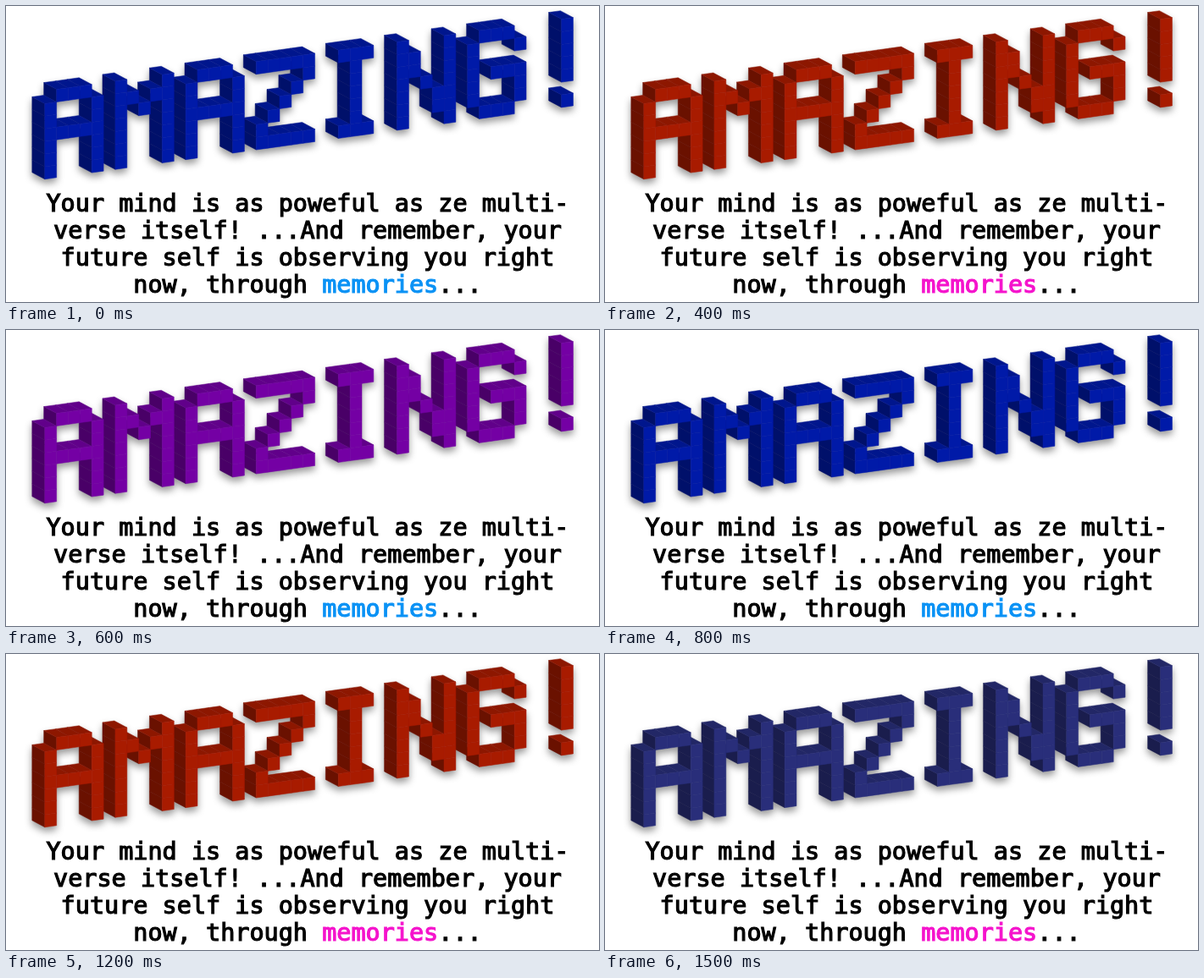
An HTML page with a canvas that plays this animation: 700 by 350 pixels, repeating every 1.6 s.

```html
<!DOCTYPE html>
<html lang="en">
<head>
<meta charset="utf-8">
<title>Amazing!</title>
<style>
  html, body { margin: 0; width: 100%; height: 100%; overflow: hidden; background: #fff; }
  canvas { display: block; }
</style>
</head>
<body>
<canvas id="stage" width="700" height="350"></canvas>
<script>
const ctx = document.getElementById('stage').getContext('2d');

const STEP = 100;
const TITLE = 'AMAZING!';
const TITLE_COLORS = [
  [0, 26, 168], [0, 165, 140], [92, 165, 0], [168, 120, 0],
  [168, 27, 0], [165, 0, 110], [116, 0, 164], [41, 46, 122]
];
const WORD_COLORS = ['#0a92f5', '#f514cc', '#7610fa'];

const GLYPHS = {
  A: '.###. #...# #...# ##### #...# #...# #...#',
  M: '#...# ##.## #.#.# #...# #...# #...# #...#',
  Z: '##### ....# ...#. ..#.. .#... #.... #####',
  I: '.###. ..#.. ..#.. ..#.. ..#.. ..#.. .###.',
  N: '#...# ##..# ##..# #.#.# #..## #..## #...#',
  G: '.###. #...# #.... #.### #...# #...# .###.',
  '!': '..#.. ..#.. ..#.. ..#.. ..#.. ..... ..#..'
};
const GLYPH_PITCH = 6;
const GLYPH_ROWS = 7;

// Oblique projection: column, row and depth vectors
const ORIGIN = { x: 45.8, y: 100.5 };
const COL = { x: 13.86, y: -1.93 };
const ROW = 14.9;
const DEPTH = { x: -15, y: -8 };

const LINES = [
  'Your mind is as poweful as ze multi-',
  'verse itself! ...And remember, your',
  'future self is observing you right',
  'now, through memories...'
];
const WORD = 'memories';
const ADVANCE = 17.14;
const TEXT_CENTER = 356;

const project = (col, row, depth) => [
  ORIGIN.x + col * COL.x + depth * DEPTH.x,
  ORIGIN.y + col * COL.y + row * ROW + depth * DEPTH.y
];

const shade = (rgb, k) => `rgb(${rgb.map(v => Math.round(v * k)).join(',')})`;

function isFilled(col, row) {
  if (col < 0 || row < 0) return false;
  const rows = GLYPHS[TITLE[Math.floor(col / GLYPH_PITCH)]].split(' ');
  return rows[row][col % GLYPH_PITCH] === '#';
}

function face(g, color, corners) {
  g.beginPath();
  corners.forEach(p => g.lineTo(...project(...p)));
  g.closePath();
  g.fillStyle = g.strokeStyle = color;
  g.fill();
  g.stroke();
}

function drawBlock(g, c, r, rgb) {
  if (!isFilled(c - 1, r)) {
    face(g, shade(rgb, 0.63), [[c, r, 0], [c, r, 1], [c, r + 1, 1], [c, r + 1, 0]]);
  }
  if (!isFilled(c, r - 1)) {
    face(g, shade(rgb, 0.84), [[c, r, 0], [c, r, 1], [c + 1, r, 1], [c + 1, r, 0]]);
  }
  face(g, shade(rgb, 1), [[c, r, 0], [c + 1, r, 0], [c + 1, r + 1, 0], [c, r + 1, 0]]);
}

function renderTitle(rgb) {
  const layer = document.createElement('canvas');
  layer.width = 700;
  layer.height = 350;
  const g = layer.getContext('2d');
  g.lineWidth = 0.5;
  g.lineJoin = 'round';
  // Far to near: right to left, bottom to top
  for (let col = TITLE.length * GLYPH_PITCH - 1; col >= 0; col--) {
    for (let row = GLYPH_ROWS - 1; row >= 0; row--) {
      if (isFilled(col, row)) drawBlock(g, col, row, rgb);
    }
  }
  return layer;
}

const titles = TITLE_COLORS.map(renderTitle);

function drawTitle(layer) {
  ctx.save();
  ctx.shadowColor = 'rgba(0,0,0,0.4)';
  ctx.shadowBlur = 9;
  ctx.shadowOffsetY = 5;
  ctx.drawImage(layer, 0, 0);
  ctx.restore();
}

function write(text, x, y, color) {
  ctx.fillStyle = ctx.strokeStyle = color;
  ctx.fillText(text, x, y);
  ctx.strokeText(text, x, y);
}

function drawText(wordColor) {
  ctx.font = `${ADVANCE / 0.602}px "DejaVu Sans Mono", monospace`;
  ctx.lineWidth = 1.2;
  ctx.lineJoin = 'miter';
  ctx.miterLimit = 3;
  LINES.forEach((line, i) => {
    const left = TEXT_CENTER - line.length * ADVANCE / 2;
    const y = 242.5 + i * 32;
    const at = line.indexOf(WORD);
    if (at < 0) return write(line, left, y, '#000');
    const end = at + WORD.length;
    write(line.slice(0, at), left, y, '#000');
    write(WORD, left + at * ADVANCE, y, wordColor);
    write(line.slice(end), left + end * ADVANCE, y, '#000');
  });
}

function draw(time) {
  const step = Math.floor(time / STEP) % TITLE_COLORS.length;
  ctx.fillStyle = '#fff';
  ctx.fillRect(0, 0, 700, 350);
  drawTitle(titles[step]);
  drawText(WORD_COLORS[step % WORD_COLORS.length]);
}

let start;
function tick(now) {
  start ??= now;
  draw(now - start);
  requestAnimationFrame(tick);
}
draw(0);
requestAnimationFrame(tick);
</script>
</body>
</html>
```
